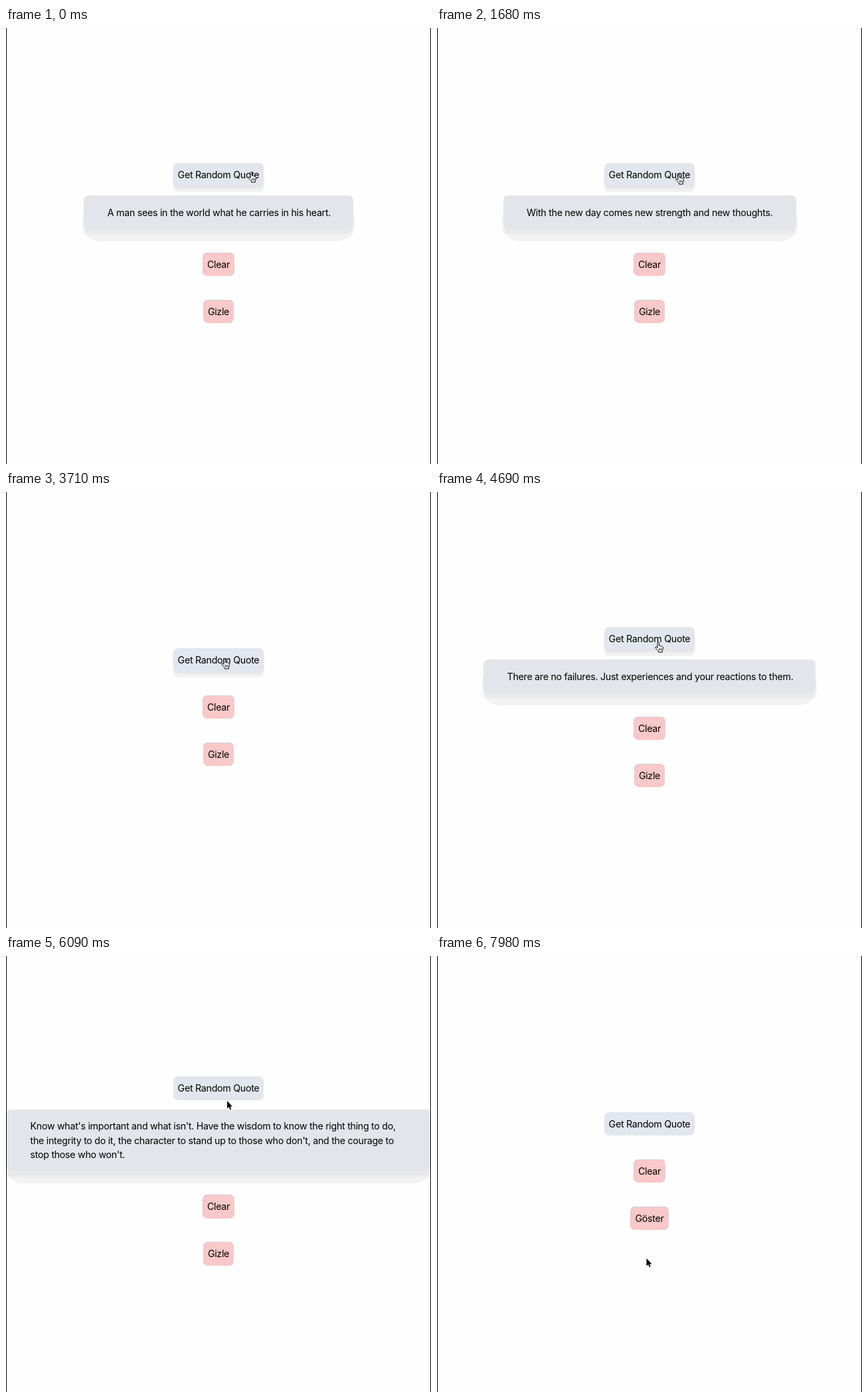
An HTML page for the animation above (8000 ms loop, 640 by 656 pixels).

```html
<!DOCTYPE html>
<html lang="en">
<head>
<meta charset="utf-8">
<title>Random quotes</title>
<style>
  html { font: 14.222px/1.5 Inter, "Open Sans", sans-serif; letter-spacing: -.284px; background: #fefefe; }
  html, body { margin: 0; width: 100%; height: 100%; overflow: hidden; }
  body { box-sizing: border-box; border: solid #000; border-width: 0 1px; cursor: none; }
  main {
    position: relative; z-index: 0; height: 647px;
    display: flex; flex-direction: column; align-items: center; justify-content: center; gap: 2.5rem;
  }
  .btn { padding: .5rem; border-radius: .5rem; background: #f9c8c8; box-shadow: inset 1px 1px 0 #d5cfd6; }
  #get { background: #e2e6ee; box-shadow: none; }
  #get.over { box-shadow: 0 4px 4px -1px #e2e4e8, 0 9px 0 #f2f2f2; }
  #quote {
    position: relative; box-sizing: border-box; margin-top: -1.5rem; padding: 1rem 2.5rem;
    border-radius: .5rem; background: #e4e5ea; box-shadow: 0 10px 3px -2px #e9e9eb;
    white-space: pre;
  }
  #quote::before {
    content: ""; position: absolute; z-index: -1; inset: 22px -2px -18.5px;
    border-radius: 10px 10px 28px 28px / 10px 10px 22px 22px; background: #f3f3f3;
  }
  #quote[hidden] { display: none; }
  svg { position: absolute; left: 0; top: 0; overflow: visible; }
</style>
</head>
<body>
<main>
  <div class="btn" id="get">Get Random Quote</div>
  <div id="quote"></div>
  <div class="btn">Clear</div>
  <div class="btn" id="toggle"></div>
</main>
<svg width="1" height="1">
  <g id="arrow">
    <path d="M0 0V11.5L2.6 9.1 4.3 13.2 6.2 12.4 4.5 8.4H8z" stroke="#fff" stroke-width="1.6" paint-order="stroke"/>
  </g>
  <g id="hand" stroke="#000" stroke-linecap="round" stroke-linejoin="round">
    <path transform="translate(-5.5 -1)" fill="#fff" d="M4.5 9.2V2.2a1.2 1.2 0 0 1 2.4 0V6.4q1.2-.6 2 .4 1.2-.5 1.9.5 1.5-.3 2 1V10.5q0 2-1 3.2V16H6V14.2L1.2 9.4q-.1-1.7 1.4-1.4z"/>
    <path transform="translate(-5.5 -1)" stroke-width=".8" d="M7 10.5v2.6M8.8 10.5v2.6M10.6 10.5v2.6"/>
  </g>
</svg>
<script>
const LOOP = 8000, STEP = 70, HIDE = 7770;

// start time, box width, text
const quotes = [
  [0, 405.5, "A man sees in the world what he carries in his heart."],
  [210, 600, "Genius is one percent inspiration and ninety-nine percent perspiration."],
  [1050, 441, "With the new day comes new strength and new thoughts."],
  [1820, 548, "Perfection is attained by slow degrees; it requires the hand of time."],
  [2240, 560, "The doorstep to the temple of wisdom is a knowledge of our own ignorance."],
  [3150, 0, ""],
  [4060, 500, "There are no failures. Just experiences and your reactions to them."],
  [5110, 522, "Time is the wisest counsellor of all, so wait for its good advice."],
  [5530, 638, "Know what's important and what isn't. Have the wisdom to know the right thing to do,\n" +
    "the integrity to do it, the character to stand up to those who don't, and the courage to\n" +
    "stop those who won't."],
  [HIDE, 0, ""]
];

// time, x, y of the pointer tip
const path = [
  [0, 369, 217], [210, 369, 217], [630, 364, 220], [2240, 364, 220], [3010, 316, 361],
  [3290, 316, 361], [3570, 329, 251], [4410, 329, 251], [4690, 333, 226], [5040, 333, 226],
  [5320, 333, 218], [6090, 333, 218], [6860, 320, 434], [7280, 313, 458], [7490, 313, 458],
  [7630, 315.5, 455], [LOOP, 315.5, 455]
];

const byId = id => document.getElementById(id);
const get = byId("get"), quote = byId("quote"), toggle = byId("toggle");
const buttons = [...document.querySelectorAll(".btn")];

function pointerAt(t) {
  const i = path.findIndex(p => p[0] > t);
  const [t0, x0, y0] = path[i - 1], [t1, x1, y1] = path[i];
  const k = (t - t0) / (t1 - t0), e = k * k * (3 - 2 * k);
  return [x0 + (x1 - x0) * e, y0 + (y1 - y0) * e];
}

function isOver(el, x, y) {
  const r = el.getBoundingClientRect();
  return x > r.left && x < r.right && y > r.top && y < r.bottom;
}

function show(id, visible, x, y) {
  byId(id).setAttribute("visibility", visible ? "visible" : "hidden");
  byId(id).setAttribute("transform", `translate(${x} ${y})`);
}

function draw(t) {
  const [, width, text] = quotes.findLast(q => q[0] <= t);
  quote.hidden = !width;
  quote.style.width = width + "px";
  quote.textContent = text;
  toggle.textContent = t < HIDE ? "Gizle" : "Göster";

  const [x, y] = pointerAt(t);
  const hand = buttons.some(b => isOver(b, x, y));
  get.classList.toggle("over", isOver(get, x, y));
  show("hand", hand, x, y);
  show("arrow", !hand, x, y);
}

function tick() {
  const t = performance.now() % LOOP;
  draw(t - t % STEP);
  requestAnimationFrame(tick);
}
tick();
</script>
</body>
</html>
```
